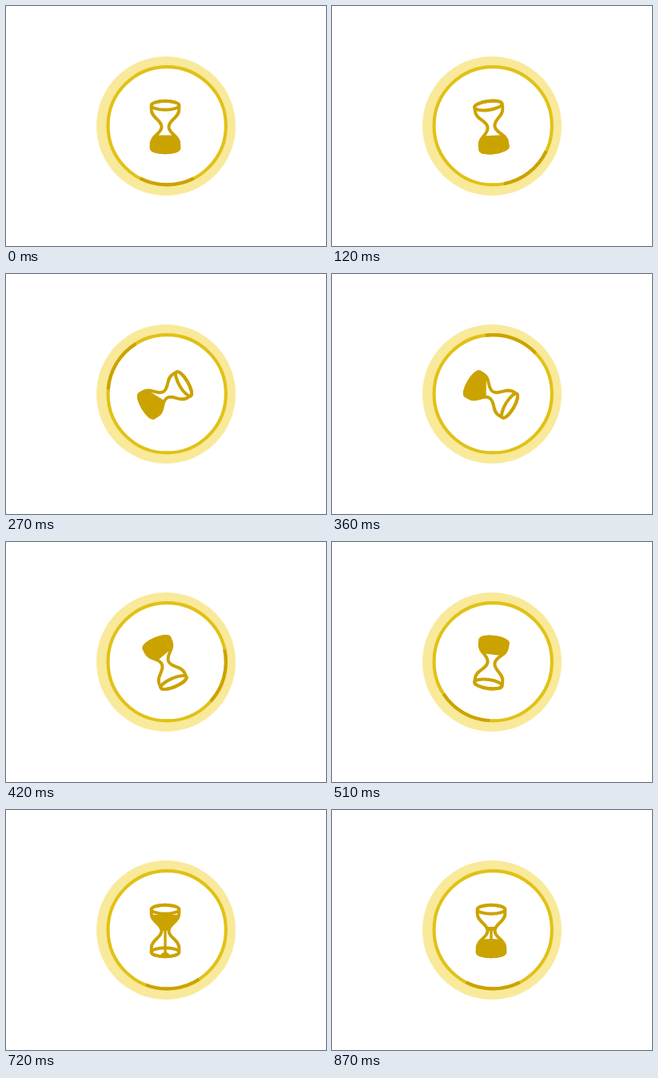
Animation of 400 by 300 pixels, one loop 900 ms. Source, as an HTML page with a canvas:

```html
<!DOCTYPE html>
<html>
<head>
<meta charset="utf-8">
<style>
  html, body { margin: 0; height: 100%; overflow: hidden; background: #fff; }
  canvas { display: block; }
</style>
</head>
<body>
<canvas id="stage" width="400" height="300"></canvas>
<script>
const ctx = document.getElementById('stage').getContext('2d');
const PALE = '#f9e99a', GOLD = '#e1c116', DARK = '#cba300';
const LOOP = 900, STEP = 30, RAD = Math.PI / 180, FULL = 2 * Math.PI;
const RX = 17.3, RY = 5.5, RIM = 26.8, NECK = 4.5;

const ramp = (t, from, to) => Math.max(0, Math.min(1, (t - from) / (to - from)));
const ease = (t, from, to) => {
  const u = ramp(t, from, to);
  return u * u * (3 - 2 * u);
};

// Degrees turned: wind up, swing past the end, settle.
const glassTurn = t =>
  -9 * ease(t, 0, 110) + 198 * ease(t, 100, 530) - 9 * ease(t, 530, 640);
const arcTurn = t =>
  -40 * ease(t, 0, 105) + 200 * ease(t, 105, 335) + 235 * ease(t, 300, 530)
  - 44 * ease(t, 530, 665) + 9 * ease(t, 665, 810);

// Both bulbs share one half outline, mirrored about the neck.
const bulb = new Path2D(`M${-NECK},0 C${-NECK},9 ${-RX},11 ${-RX},21.5 V${RIM}
  A${RX},${RY} 0 0 0 ${RX},${RIM} V21.5 C${RX},11 ${NECK},9 ${NECK},0`);
const rim = new Path2D();
rim.ellipse(0, RIM, RX, RY, 0, 0, FULL);
const glass = new Path2D();
const rims = new Path2D();
for (const flip of [1, -1]) {
  const mirror = new DOMMatrix([1, 0, 0, flip, 0, 0]);
  glass.addPath(bulb, mirror);
  rims.addPath(rim, mirror);
}

function disc(color, x, y, r) {
  ctx.fillStyle = color;
  ctx.beginPath();
  ctx.arc(x, y, r, 0, FULL);
  ctx.fill();
}

function ring(color, from, to) {
  ctx.strokeStyle = color;
  ctx.lineWidth = 4.1;
  ctx.beginPath();
  ctx.arc(201.2, 149.75, 73.65, from * RAD, to * RAD);
  ctx.stroke();
}

function drawSand(t, turn) {
  // The surface leans while the glass lies on its side.
  const lean = Math.sin(turn * RAD * .95);
  const slope = 25 * Math.tan(33 * RAD * lean);
  const near = (10.5 - 3.5 * lean) * (1 - ramp(t, 560, 620));
  const far = 36 - 31 * ramp(t, 560, 870);
  ctx.beginPath();
  ctx.moveTo(-25, near + slope);
  ctx.lineTo(25, near - slope);
  ctx.lineTo(25, far);
  ctx.lineTo(-25, far);
  ctx.fill();

  const fall = 33 * ramp(t, 600, 660), pile = ramp(t, 660, 870);
  ctx.fillRect(-1.7, -fall, 3.4, fall);
  ctx.beginPath();
  ctx.ellipse(0, -33.5, 45 * pile ** 1.5, 23.5 * pile, 0, 0, FULL);
  ctx.fill();
}

function drawGlass(t) {
  const turn = glassTurn(t);
  ctx.save();
  ctx.translate(199, 151);
  ctx.rotate(turn * RAD);
  ctx.fillStyle = ctx.strokeStyle = DARK;
  ctx.lineWidth = 4;
  ctx.lineJoin = 'round';
  ctx.save();
  ctx.clip(glass, 'nonzero');
  drawSand(t, turn);
  ctx.restore();
  ctx.stroke(glass);
  ctx.stroke(rims);
  ctx.restore();
}

function draw() {
  const t = Math.floor(performance.now() % LOOP / STEP) * STEP;
  ctx.fillStyle = '#fff';
  ctx.fillRect(0, 0, 400, 300);
  disc(PALE, 200, 150, 87);
  disc('#fff', 201.2, 149.75, 73.65);
  ring(GOLD, 0, 360);
  const mid = 90 + arcTurn(t);
  ring(DARK, mid - 27, mid + 27);
  drawGlass(t);
  requestAnimationFrame(draw);
}
draw();
</script>
</body>
</html>
```
